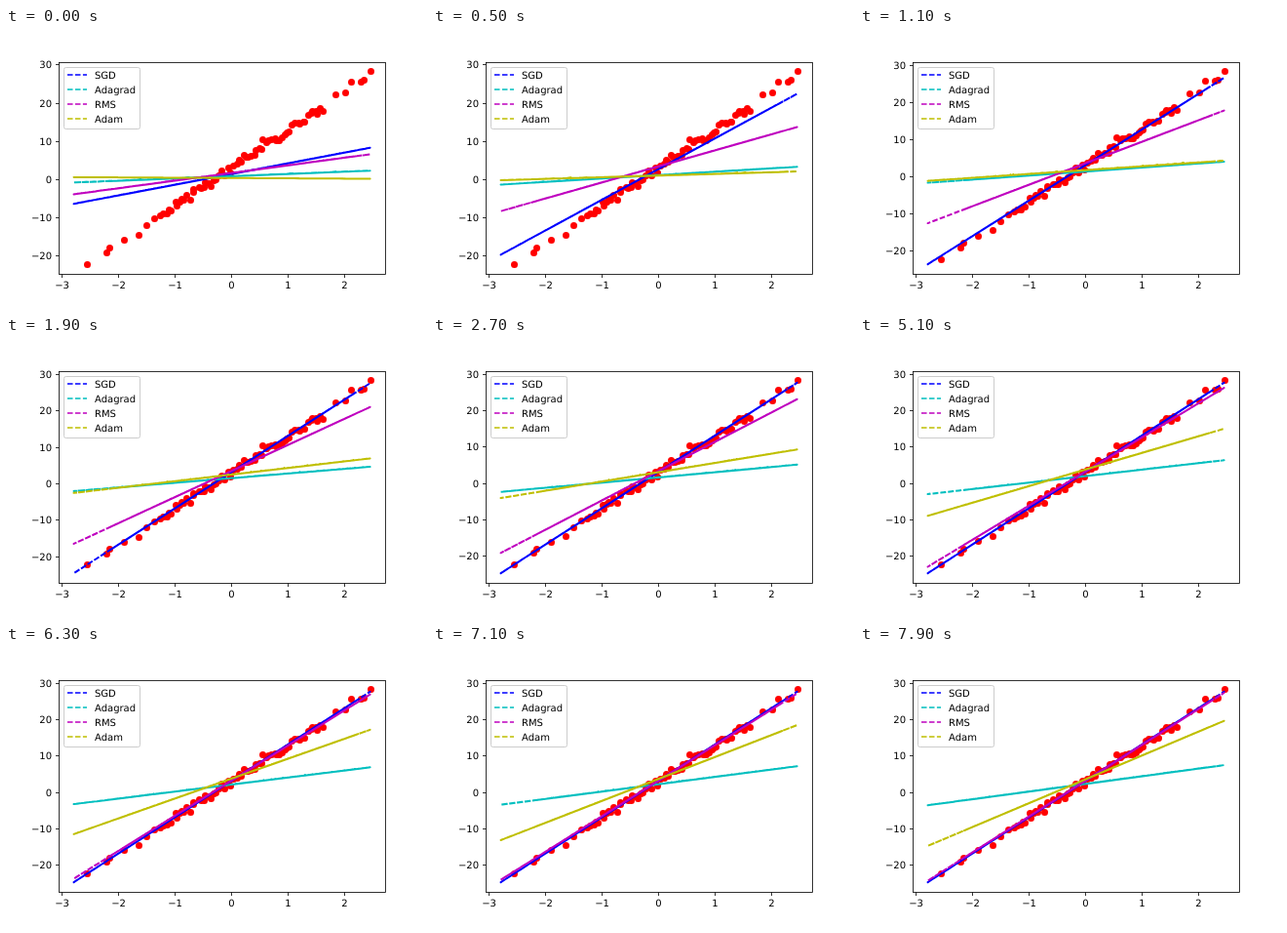
An HTML page that plays this animation: 432 px wide and 288 px high, repeating every 8000 ms.

```html
<!DOCTYPE html>
<html lang="en">
<head>
<meta charset="utf-8">
<title>Optimizer comparison</title>
<style>
  html, body { margin: 0; width: 100%; height: 100%; overflow: hidden; background: #fff; }
  svg { display: block; width: 432px; height: 288px; }
  text { font: 10px "DejaVu Sans", sans-serif; fill: #000; text-rendering: geometricPrecision; }
  .axis { fill: none; stroke: #000; stroke-width: .8; }
  .fit { fill: none; stroke-width: 2; stroke-dasharray: 5.55 2.4; stroke-linejoin: round; }
  .key { stroke-width: 1.5; stroke-dasharray: 5.55 2.4; }
</style>
</head>
<body>
<svg id="plot" viewBox="0 0 432 288"></svg>
<script>
const STEP = 100, STEPS = 80;
const X_ZERO = 230.7, X_UNIT = 57.97, X_MIN = -2.78, X_MAX = 2.465;
const Y_TOP = 44.44, Y_SPAN = 197.67, Y_MAX = 28.2, Y_MIN = -22.3;
const { exp, sin, sqrt, round } = Math;
const plot = document.getElementById('plot');

function add(tag, attrs) {
  const el = document.createElementNS('http://www.w3.org/2000/svg', tag);
  for (const key in attrs) el.setAttribute(key, attrs[key]);
  plot.appendChild(el);
  return el;
}

function label(text, x, y, anchor = 'start') {
  const el = add('text', { x, y, 'text-anchor': anchor });
  el.textContent = text;
  return el;
}

const signed = v => v < 0 ? '\u2212' + -v : String(v);
const px = x => X_ZERO + x * X_UNIT;

let seed = 11;
function random() {
  seed = (seed * 16807) % 2147483647;
  return seed / 2147483647;
}
const normal = () => sqrt(-2 * Math.log(random())) * Math.cos(2 * Math.PI * random());

// Learned weight and bias after n steps; all head for y = 10x + 3
const models = [
  {
    name: 'SGD', color: '#0000ff',
    weight: n => 9.97 - 7.17 * exp(-.262 * n),
    bias: n => 2.98 - 1.69 * exp(-.262 * n)
  },
  {
    name: 'Adagrad', color: '#00bfbf',
    weight: n => .45 + .185 * sqrt(n + .6),
    bias: n => .6 + .182 * sqrt(n + .6)
  },
  {
    name: 'RMS', color: '#bf00bf',
    weight: n => 10 - 6.96 * exp(-.047 * n) - 1.04 * exp(-.25 * n),
    bias: n => 3 + .7 * exp(-.045 * n) - 2.13 * exp(-.4 * n)
  },
  {
    name: 'Adam', color: '#bfbf00',
    weight: n => -.08 + .104 * n - .000255 * n * n,
    bias: n => 3 + 3.22 * exp(-.025 * n) * sin(.0367 * (n - 27.5))
  }
];

// Sparse tails are placed, the dense middle is scattered around the true line
const samples = [
  [-2.55, -22.3], [-2.2, -19.2], [-2.15, -17.9], [-1.9, -16], [-1.63, -14.6],
  [-1.5, -12.1], [-1.36, -10.3], [1.85, 22.2], [2.03, 22.6], [2.13, 25.6],
  [2.3, 25.6], [2.35, 25.9], [X_MAX, Y_MAX]
];
const MIDDLE = 64;
for (let i = 0; i < MIDDLE; i++) {
  const x = -1.25 + 2.9 * (i + random()) / MIDDLE;
  samples.push([x, 9.8 * x + 3 + .7 * normal()]);
}
const dots = samples.map(([x, y]) => ({
  y, el: add('circle', { cx: round(px(x)) + .5, r: 3.5, fill: '#ff0000' })
}));

// The fits visit their inputs unsorted, so the dashes overlap
const inputs = Array.from({ length: 100 }, () => Math.max(-2.35, Math.min(2.2, normal())));
inputs[37] = X_MIN;
inputs[71] = X_MAX;
for (const m of models) m.el = add('polyline', { class: 'fit', stroke: m.color });

add('rect', { class: 'axis', x: 54.5, y: 35.5, width: 335, height: 217 });
for (let v = -3; v <= 2; v++) {
  const x = round(px(v)) + .5;
  add('path', { class: 'axis', d: `M${x} 252.5v3.5` });
  label(signed(v), x, 267, 'middle');
}
const ticks = [];
for (let v = -20; v <= 30; v += 10) {
  ticks.push({ v, mark: add('path', { class: 'axis' }), text: label(signed(v), 47, 0, 'end') });
}

add('rect', { x: 59.5, y: 40.5, width: 78, height: 63, rx: 2,
  fill: '#fff', 'fill-opacity': .8, stroke: '#ccc' });
models.forEach((m, i) => {
  const y = 48 + 15 * i;
  add('path', { class: 'key', stroke: m.color, d: `M63 ${y}h20` });
  label(m.name, 91, y + 4);
});

function draw(n) {
  const fits = models.map(m => {
    const w = m.weight(n), b = m.bias(n);
    return x => w * x + b;
  });
  const low = Math.min(Y_MIN, ...fits.map(fit => fit(X_MIN)));
  const py = y => Y_TOP + (Y_MAX - y) * Y_SPAN / (Y_MAX - low);

  for (const d of dots) d.el.setAttribute('cy', round(py(d.y)) + .5);
  models.forEach((m, i) => {
    const points = inputs.map(x => px(x).toFixed(2) + ',' + py(fits[i](x)).toFixed(2));
    m.el.setAttribute('points', points.join(' '));
  });
  for (const t of ticks) {
    const y = round(py(t.v));
    t.mark.setAttribute('d', `M54.5 ${y + .5}h-3.5`);
    t.text.setAttribute('y', y + 4);
  }
}

let shown = -1;
function tick() {
  const n = Math.floor(performance.now() / STEP) % STEPS;
  if (n !== shown) draw(shown = n);
  requestAnimationFrame(tick);
}
tick();
</script>
</body>
</html>
```
